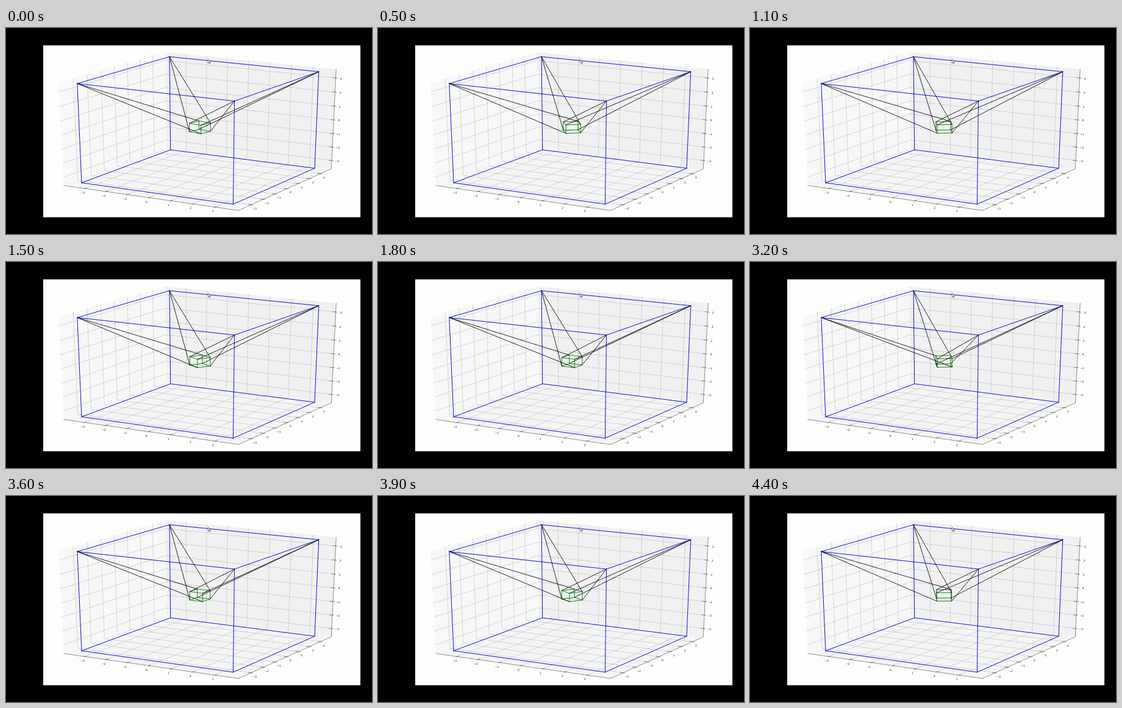
Animation of 600 by 338 pixels, one loop 4.5 s. Source, as an HTML page:

```html
<!DOCTYPE html>
<html lang="en">
<head>
<meta charset="utf-8">
<title>Cable-suspended cube</title>
<style>
  html, body { margin: 0; width: 100%; height: 100%; overflow: hidden; background: #000; }
  svg { display: block; width: 600px; height: 338px; }
  path { fill: none; stroke-linecap: round; stroke-linejoin: round; }
  text { font: 4.5px "DejaVu Sans", sans-serif; fill: #111; text-anchor: middle; dominant-baseline: central; }
</style>
</head>
<body>
<svg id="stage" viewBox="0 0 600 338">
  <rect x="61" y="28.5" width="520" height="282" fill="#fefefd"/>
</svg>
<script>
const LOOP = 4500, STEP = 100;
const ROOM = 3.5, CUBE = 0.3;   // half sizes in plot units
const T = 4.02, TZ = 3.62;      // axis limits
const C30 = Math.cos(Math.PI / 6);
const stage = document.getElementById("stage");

function add(tag, attrs) {
  const el = document.createElementNS("http://www.w3.org/2000/svg", tag);
  for (const key in attrs) el.setAttribute(key, attrs[key]);
  return stage.appendChild(el);
}

// Perspective view from azimuth -60, elevation 20
function project([px, py, pz]) {
  const x = px / ROOM, y = py / ROOM, z = pz / ROOM;
  const near = 0.5 * x - C30 * y;
  const w = 1 - 0.0439 * near - 0.0178 * z;
  return [318 + 142.3 * (C30 * x + 0.5 * y) / w, 163 + (29.65 * near - 80.25 * z) / w];
}

const line = (...pts) => "M" + pts.map(p => project(p).map(n => n.toFixed(2)).join(" ")).join("L");
const stroke = (color, width, d = "") => add("path", { stroke: color, "stroke-width": width, d });
const pane = (color, ...pts) => add("path", { d: line(...pts) + "Z", style: "fill:" + color });

function label(value, point, dx, dy) {
  const [x, y] = project(point);
  add("text", { x: x + dx, y: y + dy }).textContent = String(value).replace("-", "\u2212");
}

// Corners run counter-clockwise: four at the bottom, then four at the top
function corners(half, turn = 0) {
  const out = [];
  for (const z of [-half, half])
    for (let i = 0; i < 4; i++) {
      const a = (225 + 90 * i + turn) * Math.PI / 180, r = half * Math.SQRT2;
      out.push([r * Math.cos(a), r * Math.sin(a), z]);
    }
  return out;
}

function boxPath(c) {
  let d = "";
  for (let i = 0; i < 4; i++) {
    const j = (i + 1) % 4;
    d += line(c[i], c[j]) + line(c[i + 4], c[j + 4]) + line(c[i], c[i + 4]);
  }
  return d;
}

function drawAxes() {
  pane("#f8f8f8", [-T, -T, -TZ], [-T, T, -TZ], [-T, T, TZ], [-T, -T, TZ]);
  pane("#f1f1f1", [-T, T, -TZ], [T, T, -TZ], [T, T, TZ], [-T, T, TZ]);
  pane("#f5f5f5", [-T, -T, -TZ], [T, -T, -TZ], [T, T, -TZ], [-T, T, -TZ]);

  const out = T + 0.07, inn = T - 0.13;
  let grid = "", ticks = "";
  for (let n = -3; n <= 3; n++) {
    grid += line([n, -T, -TZ], [n, T, -TZ], [n, T, TZ])
          + line([T, n, -TZ], [-T, n, -TZ], [-T, n, TZ])
          + line([-T, -T, n], [-T, T, n], [T, T, n]);
    ticks += line([n, -out, -TZ], [n, -inn, -TZ])
           + line([out, n, -TZ], [inn, n, -TZ])
           + line([out, T, n], [inn, T, n]);
    label(n, [n, -T, -TZ], -3.7, 6.7);
    label(n, [T, n, -TZ], 5.8, 6.2);
    label(n, [T, T, n], 8.7, 1.2);
  }
  stroke("#b0b0b0", 0.5, grid);
  stroke("#222", 0.5, line([-T, -T, -TZ], [T, -T, -TZ], [T, T, -TZ], [T, T, TZ]) + ticks);
}

drawAxes();
const room = corners(ROOM);
stroke("#0000f0", 0.95, boxPath(room));
const cube = stroke("#007d00", 0.9);
const cables = stroke("#000", 0.85);
add("path", {
  d: "M331.3 51.8V57.6L332.7 56.4L333.7 58.6L334.6 58.2L333.7 56H335.4Z",
  style: "fill:#fff", stroke: "#222", "stroke-width": 0.6
});

// Each upper room corner holds one bottom and one top corner of the cube
const links = [[1, 7], [2, 4], [3, 5], [0, 6]];

function draw(now) {
  const t = Math.floor((now % LOOP) / STEP) * STEP / 1000;
  const c = corners(CUBE, 57.5 * Math.sin(1.7 * t - 3.02) - 2.5);
  cube.setAttribute("d", boxPath(c));
  cables.setAttribute("d", links.map((pair, i) =>
    pair.map(k => line(room[i + 4], c[k])).join("")).join(""));
}

const start = performance.now();
function frame() {
  draw(performance.now() - start);
  requestAnimationFrame(frame);
}
frame();
</script>
</body>
</html>
```
